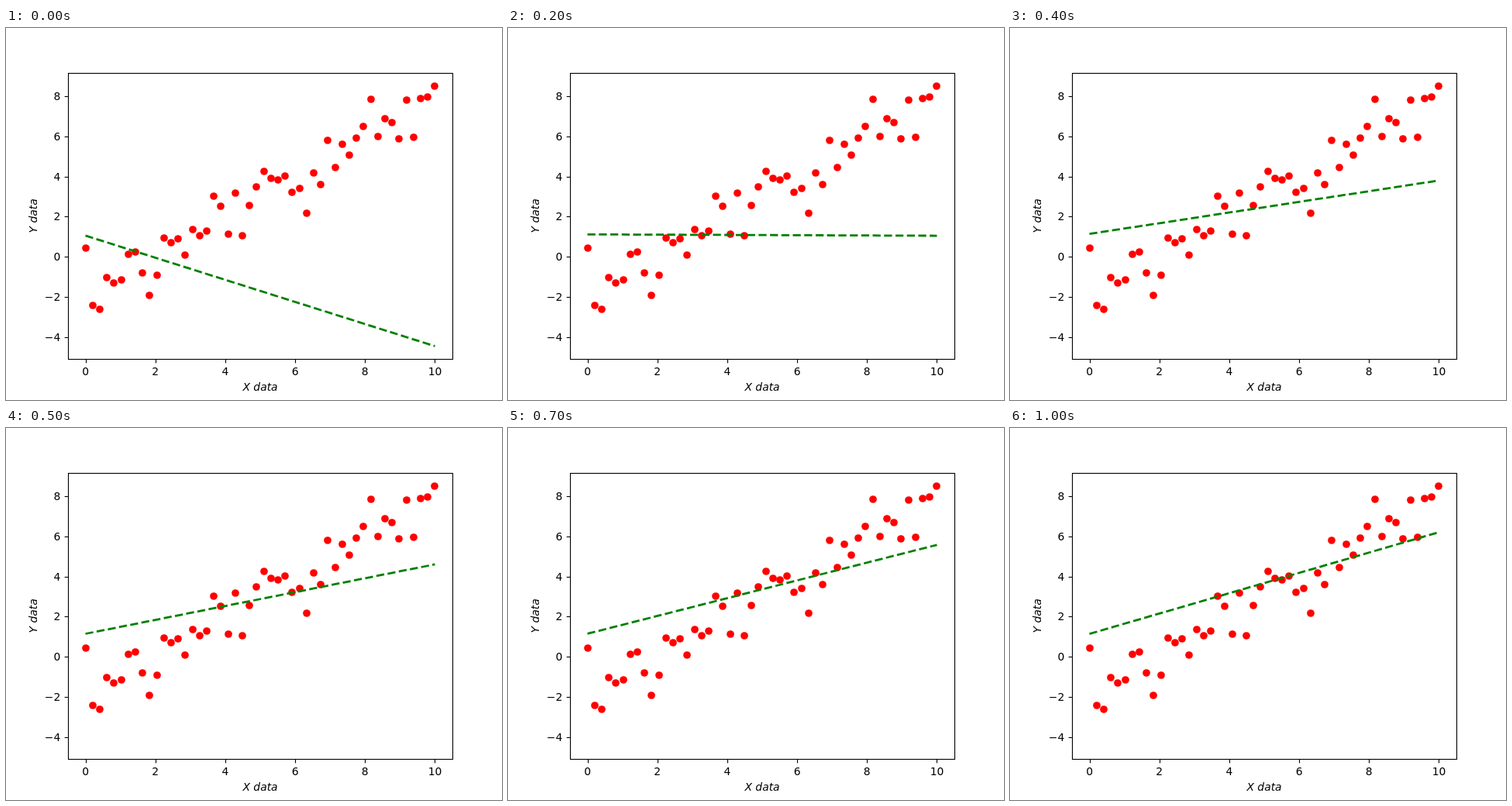
Recreate the animation shown at these times as an HTML page with a canvas. Size 640 by 480 pixels, loop 1100 ms.

```html
<!DOCTYPE html>
<html lang="en">
<head>
<meta charset="utf-8">
<title>Line fit</title>
<style>
html, body { margin: 0; width: 100%; height: 100%; overflow: hidden; background: #fff; }
canvas { display: block; width: 640px; height: 480px; }
</style>
</head>
<body>
<canvas id="plot" width="640" height="480"></canvas>
<script>
const ctx = document.getElementById('plot').getContext('2d');
const STEP = 100, STEPS = 11;
const FONT = '13.89px "DejaVu Sans", sans-serif';
const X0 = 102.545, X_UNIT = 45.091, Y0 = 295.2, Y_UNIT = 25.9;
const xPos = v => X0 + v * X_UNIT;
const yPos = v => Y0 - v * Y_UNIT;

// pixel heights of 50 samples spread evenly over 0..10
const samples = [
  284, 358, 363, 322, 329, 325, 292, 289, 316, 345,
  319, 271, 277, 272, 293, 260, 268, 262, 217, 230,
  266, 213, 268, 229, 205, 185, 194, 196, 191, 212,
  207, 239, 187, 202, 145, 180, 150, 164, 142, 127,
  92, 140, 117, 122, 143, 93, 141, 91, 89, 75
];

function segment(x1, y1, x2, y2) {
  ctx.beginPath();
  ctx.moveTo(x1, y1);
  ctx.lineTo(x2, y2);
  ctx.stroke();
}

function label(text, x, y, align, italic) {
  ctx.font = (italic ? 'italic ' : '') + FONT;
  ctx.textAlign = align;
  ctx.fillText(text, x, y);
}

function drawSamples() {
  ctx.fillStyle = '#f00';
  samples.forEach((y, i) => {
    ctx.beginPath();
    ctx.arc(Math.round(xPos(i * 10 / 49)), y, 4.86, 0, Math.PI * 2);
    ctx.fill();
  });
}

// gradient descent: the error shrinks by a fixed ratio each step
function drawFit(n) {
  const decay = Math.pow(Math.SQRT1_2, n);
  const left = 264.2 + 3.7 * decay + 0.13 * n;
  const right = 125.6 + 284.9 * decay;
  ctx.strokeStyle = '#008000';
  ctx.lineWidth = 2.78;
  ctx.setLineDash([10.28, 4.44]);
  segment(xPos(0), left, xPos(10), right);
  ctx.setLineDash([]);
}

function drawAxes() {
  ctx.strokeStyle = ctx.fillStyle = '#000';
  ctx.lineWidth = 1.11;
  ctx.strokeRect(80.5, 58.5, 496, 369);
  for (let v = 0; v <= 10; v += 2) {
    const x = Math.round(xPos(v)) + 0.5;
    segment(x, 427.5, x, 432.4);
    label(String(v), xPos(v), 448, 'center');
  }
  for (let v = -4; v <= 8; v += 2) {
    const y = Math.round(yPos(v));
    segment(75.6, y + 0.5, 80.5, y + 0.5);
    label(String(v).replace('-', '\u2212'), 70.3, y + 5, 'right');
  }
  label('X data', 328, 468, 'center', true);
  ctx.save();
  ctx.translate(40, 242.4);
  ctx.rotate(-Math.PI / 2);
  label('Y data', 0, 0, 'center', true);
  ctx.restore();
}

function draw(n) {
  ctx.fillStyle = '#fff';
  ctx.fillRect(0, 0, 640, 480);
  drawSamples();
  drawFit(n);
  drawAxes();
}

const start = performance.now();
function tick() {
  const t = Math.max(0, performance.now() - start);
  draw(Math.floor(t / STEP) % STEPS);
  requestAnimationFrame(tick);
}
tick();
</script>
</body>
</html>
```
